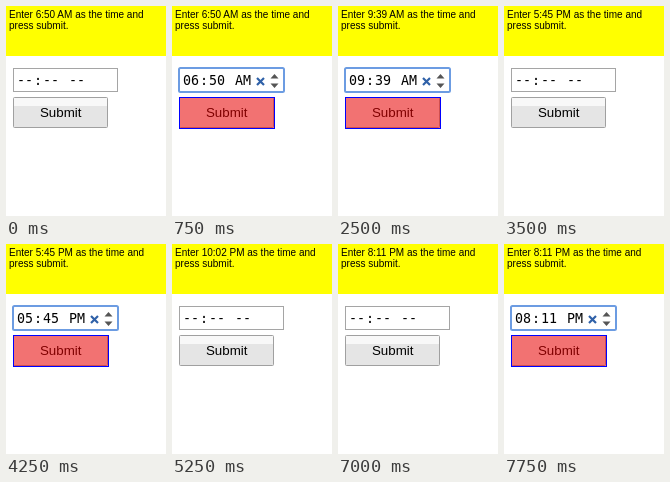
These frames come from a looping animation (160x210 px, 8750 ms). An HTML page:

```html
<!DOCTYPE html>
<html lang="en">
<head>
<meta charset="utf-8">
<title>Enter the time</title>
<style>
  html, body { margin: 0; width: 100%; height: 100%; overflow: hidden; background: #fff; }
  svg { display: block; width: 160px; height: 210px; }
  text { white-space: pre; }
  .query { font: 10px "Liberation Sans", Arial, sans-serif; }
  .label { font: 13.333px "Liberation Sans", Arial, sans-serif; text-anchor: middle; }
  .field { font: 13.333px "DejaVu Sans Mono", monospace; }
  .mark { fill: #f00; fill-opacity: .5; stroke: #00f; }
</style>
</head>
<body>
<svg viewBox="0 0 160 210">
  <rect width="160" height="210" fill="#fff"/>
  <rect width="160" height="50" fill="#ff0"/>
  <text class="query" id="query" x="3" y="12"></text>
  <text class="query" x="3" y="23">press submit.</text>

  <rect x="7.5" y="62.5" width="104" height="23" fill="#fff" stroke="#a5a5a5"/>
  <g class="field">
    <text id="hour" x="11" y="79"></text>
    <text x="28" y="79">:</text>
    <text id="minute" x="37" y="79"></text>
    <text id="half" x="63" y="79"></text>
  </g>
  <g id="focus">
    <rect x="7" y="62" width="105" height="24" rx="1.5" fill="none" stroke="#6c9ce2" stroke-width="2"/>
    <path d="M85 72l7 7M92 72l-7 7" stroke="#2f61a8" stroke-width="2.2"/>
    <path d="M98.5 72.5l4-4.5 4 4.5zM98.5 77.500l4 4.500 4-4.500z" fill="#555"/>
  </g>
  <rect class="mark" id="fieldMark" x="7.5" y="62.5" width="105" height="24"/>

  <rect x="7.5" y="91.5" width="94" height="30" rx="1" fill="#e5e5e5" stroke="#a0a0a0"/>
  <rect id="shine" x="8" y="92" width="93" height="8" fill="#f8f8f8"/>
  <text class="label" x="54.700" y="111">Submit</text>
  <rect class="mark" id="buttonMark" x="7.5" y="91.5" width="95" height="31"/>
</svg>
<script>
  const ROUND = 1750;
  const TIMES = ["6:50 AM", "9:39 AM", "5:45 PM", "10:02 PM", "8:11 PM"];
  const get = id => document.getElementById(id);
  const show = (id, on) => get(id).setAttribute("visibility", on ? "visible" : "hidden");
  const write = (id, text) => { get(id).textContent = text; };

  function draw(ms) {
    const t = ms % (ROUND * TIMES.length);
    const time = TIMES[Math.floor(t / ROUND)];
    const step = Math.min(3, Math.floor(t % ROUND / 250)); // idle, pick field, typed, pick button
    const typed = step >= 2;
    const [hour, minute, half] = typed ? time.split(/[: ]/) : ["--", "--", "--"];

    write("query", `Enter ${time} as the time and`);
    write("hour", hour.padStart(2, "0"));
    write("minute", minute);
    write("half", half);
    show("focus", typed);
    show("fieldMark", step === 1);
    show("buttonMark", step === 3);
    show("shine", step !== 3);
  }

  const start = performance.now();
  function tick() {
    draw(performance.now() - start);
    requestAnimationFrame(tick);
  }
  tick();
</script>
</body>
</html>
```
